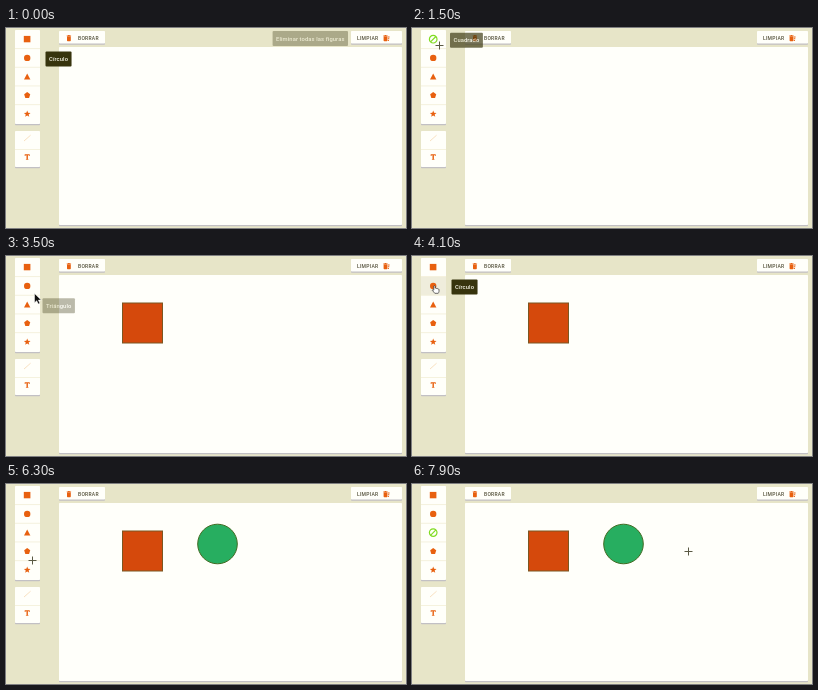
Write an HTML page that moves like this. It is 400x200 px and loops after 8000 ms.

```html
<!DOCTYPE html>
<html lang="es">
<head>
<meta charset="utf-8">
<title>Editor de figuras</title>
<style>
  html, body { margin: 0; width: 100%; height: 100%; overflow: hidden; background: #e7e5c8; }
  svg { display: block; width: 100vw; height: 100vh; }
  text { font-family: Roboto, "Open Sans", sans-serif; font-weight: 500; }
  .label { font-size: 5px; letter-spacing: .25px; fill: #55523c; }
  .tip text { font-size: 5.8px; letter-spacing: .1px; fill: #f6f5e6; }
  .tip rect { fill: #37340d; }
  .panel { fill: #fffffa; }
  .shade { fill: #c2c0c4; }
  .rule { stroke: #f1eed6; stroke-width: .8; }
  .icon { fill: #e8600f; }
</style>
</head>
<body>
<svg id="stage" viewBox="0 0 400 200" preserveAspectRatio="none"></svg>
<script>
const stage = document.getElementById('stage');
const LOOP = 8000, STEP = 100;
const TOOL_X = 21.2;
const rowY = row => 11.2 + 18.7 * row;

function add(tag, attrs, parent = stage, text) {
  const el = document.createElementNS('http://www.w3.org/2000/svg', tag);
  for (const key in attrs) el.setAttribute(key, attrs[key]);
  if (text) el.textContent = text;
  parent.appendChild(el);
  return el;
}

const place = (el, x, y) => el.setAttribute('transform', `translate(${x} ${y})`);
const show = (el, on) => el.setAttribute('visibility', on ? 'visible' : 'hidden');
const clamp = v => Math.max(0, Math.min(1, v));
const ease = k => k * k * (3 - 2 * k);

function panel(x, y, width, height) {
  add('rect', { class: 'shade', x, y: y + 1.2, width, height, rx: .8 });
  add('rect', { class: 'panel', x, y, width, height, rx: .8 });
}

function polygon(count, ...radii) {
  return Array.from({ length: count }, (_, i) => {
    const a = -Math.PI / 2 + i * 2 * Math.PI / count;
    const r = radii[i % radii.length];
    return `${r * Math.cos(a)},${r * Math.sin(a)}`;
  }).join(' ');
}

// Panels and buttons
panel(53, 19, 343, 178);
panel(9, 2, 25, 94);
panel(9, 103, 25, 36);
panel(53, 3, 46, 12.5);
panel(345, 3, 51, 12.5);
const hover = add('rect', { x: 9, y: -9, width: 25, height: 18.2, fill: '#efeddc' });
for (const row of [0, 1, 2, 3, 5.4]) add('path', { class: 'rule', d: `M9 ${rowY(row + .5)}h25` });
add('text', { class: 'label', x: 72, y: 11.7 }, stage, 'BORRAR');
add('text', { class: 'label', x: 351, y: 11.7 }, stage, 'LIMPIAR');

const bin = 'M-2.2-2.6h1.2l.4-.5h1.2l.4.5h1.2v.8h-4.4zM-1.9-1.4h3.8v4q0 .7-.7.7h-2.4q-.7 0-.7-.7z';
place(add('path', { class: 'icon', d: bin }), 62.9, 10);
place(add('path', { class: 'icon', d: bin + 'M2.4-1.6h1.7v1h-1.7zM2.4.2h1.4v1h-1.4zM2.4 2h1v1h-1z' }), 379.5, 10);

// Tool icons
const icons = [
  ['rect', { x: -3.4, y: -3.3, width: 6.6, height: 6.4 }],
  ['circle', { r: 3.2 }],
  ['path', { d: 'M0-3L3.2 3H-3.2z' }],
  ['polygon', { points: polygon(5, 3.2) }],
  ['polygon', { points: polygon(10, 3.5, 1.5) }]
].map(([tag, attrs], row) => {
  const el = add(tag, { class: 'icon', ...attrs });
  place(el, TOOL_X, rowY(row));
  return el;
});
add('path', { d: 'M18 113L24.6 107.2', stroke: '#f5d3a8', 'stroke-width': .7 });
add('path', { class: 'icon', d: 'M18.7 126.3h5v1.6h-.6l-.4-.7h-.8v3.9l.7.3v.4h-2.8v-.4l.7-.3v-3.9h-.8l-.4.7h-.6z' });

const ban = add('g', { fill: 'none', stroke: '#80dc22', 'stroke-width': 1.2 });
add('circle', { r: 3.8 }, ban);
add('path', { d: 'M-2.7 2.7L2.7-2.7' }, ban);

// Each round picks a tool and later drops its figure
const square = add('rect', { x: 116.5, y: 47, width: 40, height: 40, fill: '#d5490c', stroke: '#7b5722' });
const circle = add('circle', { cx: 211.5, cy: 60, r: 19.8, fill: '#27ae60', stroke: '#416b22' });
const rounds = [
  { pick: 1400, drop: 2600, figure: square },
  { pick: 4200, drop: 5700, figure: circle },
  { pick: 7000, drop: LOOP }
];

// Tooltips
function tip(label, from, to, row) {
  const el = add('g', { class: 'tip' });
  const box = add('rect', { height: 15, rx: 1 }, el);
  const text = add('text', { x: 3.5, y: 9.6 }, el, label);
  const width = text.getComputedTextLength() + 7;
  box.setAttribute('width', width);
  const tool = row !== undefined;
  return { el, from, to, x: tool ? 39.5 : 342 - width, y: tool ? rowY(row) - 6.4 : 3, slide: tool ? 4.5 : 0 };
}
const tips = [
  tip('Eliminar todas las figuras', -900, -200),
  tip('Círculo', -500, 400, 1),
  tip('Cuadrado', 400, 1400, 0),
  tip('Triángulo', 3000, 3300, 2),
  tip('Círculo', 3500, 4400, 1),
  tip('Pentágono', 6300, 6500, 3),
  tip('Triángulo', 6500, 7100, 2)
];

// Pointers with the hot spot at 0,0
const pointers = {
  cross: add('path', { d: 'M-4 0H4M0-4V4', stroke: '#5a5944' }),
  arrow: add('path', { d: 'M0 0V9.2L2.2 7.2L3.8 10.6L5.4 9.8L3.9 6.6H6.7z', fill: '#111', stroke: '#fff', 'stroke-width': .5 }),
  hand: add('path', {
    d: 'M-.7 .5Q0-.5.7.5V2.6Q1.8 2.2 2 3Q3.1 2.6 3.3 3.5Q4.4 3.2 4.5 4.2V5.8Q4.4 6.9 3.7 7.8H.3L-2.3 4.7Q-2.2 3.7-.7 4.7z',
    fill: '#fff', stroke: '#333', 'stroke-width': .7
  })
};

// Eased trips, each starting where the last one ended
const home = { x: 2, y: 27 };
const trips = [
  { from: 100, to: 500, bend: [14, 22], end: [22, 11] },
  { from: 1400, to: 2200, bend: [88, 84], end: [136.5, 67] },
  { from: 2700, to: 3700, bend: [50, 75], end: [22, 29] },
  { from: 4200, to: 4900, bend: [100, 48], end: [212, 60] },
  { from: 5800, to: 6300, bend: [90, 100], end: [26.5, 76] },
  { from: 6300, to: 6700, bend: [23, 64], end: [22, 48] },
  { from: 7000, to: 7900, bend: [222, 146], end: [276.5, 67] }
];

function pointAt(t) {
  let { x, y } = home;
  for (const { from, to, bend, end } of trips) {
    const k = ease(clamp((t - from) / (to - from)));
    const mix = (a, b, c) => (1 - k) ** 2 * a + 2 * k * (1 - k) * b + k * k * c;
    x = mix(x, bend[0], end[0]);
    y = mix(y, bend[1], end[1]);
    if (t < to) break;
  }
  return { x, y };
}

function draw(t) {
  const tool = rounds.findIndex(r => t >= r.pick && t < r.drop);
  icons.forEach((el, i) => show(el, i !== tool));
  show(ban, tool >= 0);
  place(ban, TOOL_X, rowY(Math.max(tool, 0)));
  for (const { figure, drop } of rounds) if (figure) show(figure, t >= drop);

  for (const { el, x, y, from, to, slide } of tips) {
    const leave = clamp((t - to) / 300);
    el.setAttribute('opacity', Math.min(clamp((t - from) / 200), 1 - leave));
    place(el, x - slide * leave, y);
  }

  // The drawing cursor lingers over the toolbar once the circle is placed
  const { x, y } = pointAt(t);
  const onIcon = Math.abs(x - TOOL_X) < 4.5;
  const drawing = tool >= 0 || x > 34 || t >= rounds[1].drop;
  const kind = onIcon && t !== trips[4].to ? 'hand' : drawing ? 'cross' : 'arrow';
  for (const name in pointers) {
    show(pointers[name], name === kind && t >= trips[0].from);
    place(pointers[name], Math.floor(x) + .5, Math.floor(y) + .5);
  }
  show(hover, kind === 'hand' && tool < 0);
  place(hover, 0, rowY(Math.round((y - rowY(0)) / 18.7)));
}

const start = performance.now();
function tick(now) {
  const t = Math.max(0, now - start) % LOOP;
  draw(Math.floor(t / STEP) * STEP);
  requestAnimationFrame(tick);
}
draw(0);
requestAnimationFrame(tick);
</script>
</body>
</html>
```
